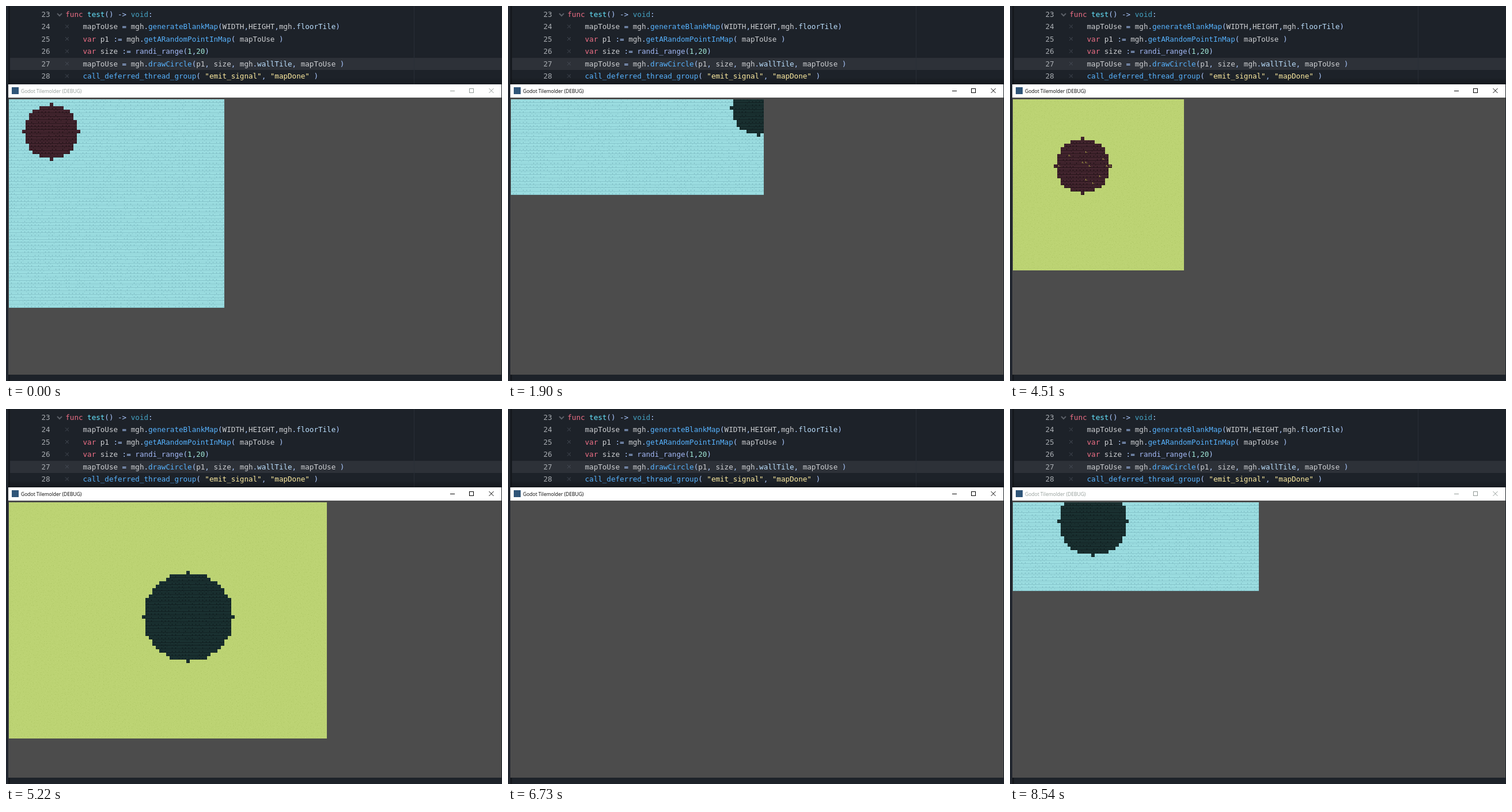
An HTML page with a canvas for the animation above (8640 ms loop, 861 by 651 pixels).

```html
<!DOCTYPE html>
<html lang="en">
<head>
<meta charset="utf-8">
<title>Random circle maps</title>
<style>
  html, body { margin: 0; width: 100%; height: 100%; overflow: hidden; background: #1d2229; }
  canvas { display: block; }
</style>
</head>
<body>
<canvas id="stage" width="861" height="651"></canvas>
<script>
const ctx = document.getElementById('stage').getContext('2d');
const LOOP = 8640, TILE = 5.94, LEFT = 4.5, TOP = 162;

// start time, floor + wall style, columns, rows, circle column, row, radius
const scenes = [
  [0, 'br', 63, 61, 12, 9, 8],
  [500, 'gt', 94, 73, 40, 30, 11],
  [800, 'br', 70, 45, 50, 20, 9],
  [1200, 'gr', 78, 66, 30, 38, 12],
  [1600, 'bt', 60, 53, 22, 30, 6],
  [1900, 'bt', 74, 28, 72, 2, 8],
  [2300, 'gr', 81, 66, 44, 24, 10],
  [2600],
  [2700, 'bt', 97, 48, 60, 26, 9],
  [3000, 'gr', 81, 67, 80, 32, 15],
  [3410, 'br', 100, 26, 48, 12, 7],
  [3810, 'gt', 59, 72, 30, 44, 10],
  [4110, 'br', 46, 44, 18, 22, 5],
  [4510, 'gm', 50, 50, 20, 19, 8],
  [4810, 'gt', 97, 56, 66, 28, 11],
  [5220, 'gt', 93, 69, 52, 33, 13],
  [5620, 'bt', 82, 38, 24, 16, 9],
  [6030, 'gr', 66, 43, 40, 21, 7],
  [6330, 'br', 79, 43, 52, 18, 10],
  [6730],
  [6830, 'gt', 55, 40, 26, 20, 6],
  [7130],
  [7230, 'gr', 52, 66, 24, 40, 11],
  [7540, 'bt', 77, 36, 50, 14, 8],
  [7940, 'gr', 64, 43, 34, 24, 9],
  [8540, 'bt', 72, 26, 23, 5, 10],
];

// face, mortar, faint mortar
const bricks = {
  b: ['#9fe1e4', '#80bfc6', '#90d1d6'],
  r: ['#472731', '#201116', '#331c24'],
  t: ['#1b3333', '#0f1c1e', '#152829'],
};
bricks.m = bricks.r;

const code = [
  'func test() -> void:',
  '    mapToUse = mgh.generateBlankMap(WIDTH,HEIGHT,mgh.floorTile)',
  '    var p1 := mgh.getARandomPointInMap( mapToUse )',
  '    var size := randi_range(1,20)',
  '    mapToUse = mgh.drawCircle(p1, size, mgh.wallTile, mapToUse )',
  '    call_deferred_thread_group( "emit_signal", "mapDone" )',
];

// The first matching rule colours the token.
const syntax = [
  [/^"/, '#ffeda1'],
  [/^(func|var)$/, '#ee6f86'],
  [/^test$/, '#66e6ff'],
  [/^void$/, '#45a3c4'],
  [/^randi_range$/, '#a3b8f5'],
  [/^(generateBlankMap|getARandomPointInMap|drawCircle|call_deferred\w+)$/, '#57b3ff'],
  [/^(floorTile|wallTile)$/, '#bce0ff'],
  [/^\d/, '#a1e8d8'],
  [/^\w/, '#cdcfd2'],
  [/./, '#abc9ff'],
];

function rect(color, x, y, w, h) {
  ctx.fillStyle = color;
  ctx.fillRect(x, y, w, h);
}

function text(string, x, y, color) {
  ctx.fillStyle = color;
  ctx.fillText(string, x, y);
}

function line(color, ...points) {
  ctx.strokeStyle = color;
  ctx.beginPath();
  for (const [x, y, jump] of points) jump ? ctx.moveTo(x, y) : ctx.lineTo(x, y);
  ctx.stroke();
}

function random(seed) {
  const value = Math.sin(seed * 12.9898) * 43758.5453;
  return value - Math.floor(value);
}

function drawEditor() {
  rect('#1d2229', 0, 0, 861, 651);
  rect('#2d3138', 6, 90, 855, 21);
  rect('#292e36', 708, 0, 1, 137);
  rect('#20252d', 0, 0, 4, 651);
  rect('#15191e', 4, 0, 3, 651);
  ctx.font = '12.57px "DejaVu Sans Mono", monospace';
  const advance = ctx.measureText('0').width;
  code.forEach((source, row) => {
    const y = 18.5 + row * 21.5;
    text(23 + row, 61.5, y, '#a9adb2');
    for (const token of source.matchAll(/"[^"]*"|\w+|[^\s\w]+/g)) {
      const color = syntax.find(([pattern]) => pattern.test(token[0]))[1];
      text(token[0], 103.3 + token.index * advance, y, color);
    }
    if (row) {
      const c = y - 4.5;
      line('#454b55', [103, c - 3, 1], [106, c], [103, c + 3], [108.5, c - 3, 1], [106.5, c], [108.5, c + 3]);
    }
  });
  ctx.lineWidth = 2;
  line('#5b6068', [89, 13, 1], [93, 17], [97, 13]);
  ctx.lineWidth = 1;
}

function drawWindow(active) {
  const shadow = ctx.createLinearGradient(0, 124, 0, 136);
  shadow.addColorStop(0, 'rgba(0,0,0,0)');
  shadow.addColorStop(1, active ? 'rgba(0,0,0,.3)' : 'rgba(0,0,0,.2)');
  rect(shadow, 4, 124, 856, 12);
  rect('#4c4c4c', 4, 136, 856, 504);
  rect('#fff', 4, 136, 856, 23);
  rect('#2f5578', 10, 141, 12, 12);
  const ink = active ? '#000' : '#929b97';
  ctx.font = '8.5px "Open Sans", sans-serif';
  text('Godot Tilemolder (DEBUG)', 26, 150.5, ink);
  line(ink, [771, 147.5, 1], [779, 147.5]);
  ctx.strokeRect(804.5, 143.5, 7, 7);
  line(ink, [838.5, 143, 1], [846.5, 151], [846.5, 143, 1], [838.5, 151]);
}

function drawGrass(x, y, w, h, seed) {
  rect('#bcd373', x, y, w, h);
  for (let i = 0; i < 3; i++) {
    const dx = Math.floor(random(seed + i * 0.37) * 5);
    const dy = Math.floor(random(seed + i * 0.71) * 5);
    rect(i ? '#b2ca69' : '#c3d97c', x + dx, y + dy, 1, 1);
  }
}

function drawBrick(style, x, y, w, h, seed) {
  const [face, mortar, faint] = bricks[style];
  rect(face, x, y, w, h);
  rect(mortar, x, y + h - 1, w, 1);
  rect(faint, x, y + 2, w, 1);
  if (random(seed) < 0.4) rect(faint, x + 1, y, 1, 2);
  if (random(seed + 0.5) < 0.7) rect(mortar, x + 4, y + 3, 1, 2);
  if (style === 'm' && random(seed + 0.8) < 0.08) {
    rect('#a7a344', x + 2, y + 1, 1, 3);
    rect('#a7a344', x + 4, y + 3, 1, 1);
  }
}

function drawMap([, style, columns, rows, cx, cy, radius]) {
  for (let row = 0; row < rows; row++) {
    const y = Math.round(TOP + row * TILE);
    const h = Math.round(TOP + (row + 1) * TILE) - y;
    for (let column = 0; column < columns; column++) {
      const x = Math.round(LEFT + column * TILE);
      const w = Math.round(LEFT + (column + 1) * TILE) - x;
      const inside = (column - cx) ** 2 + (row - cy) ** 2 <= radius ** 2;
      const tile = style[inside ? 1 : 0];
      const seed = row * 101 + column;
      if (tile === 'g') drawGrass(x, y, w, h, seed);
      else drawBrick(tile, x, y, w, h, seed);
    }
  }
}

let shown = '';
function frame(now) {
  const time = now % LOOP;
  const scene = scenes.findLast(([start]) => start <= time);
  const active = time >= 100 && time < 8540;
  const state = scene[0] + ':' + active;
  if (state !== shown) {
    shown = state;
    drawEditor();
    drawWindow(active);
    if (scene[1]) drawMap(scene);
  }
  requestAnimationFrame(frame);
}
frame(0);
</script>
</body>
</html>
```
